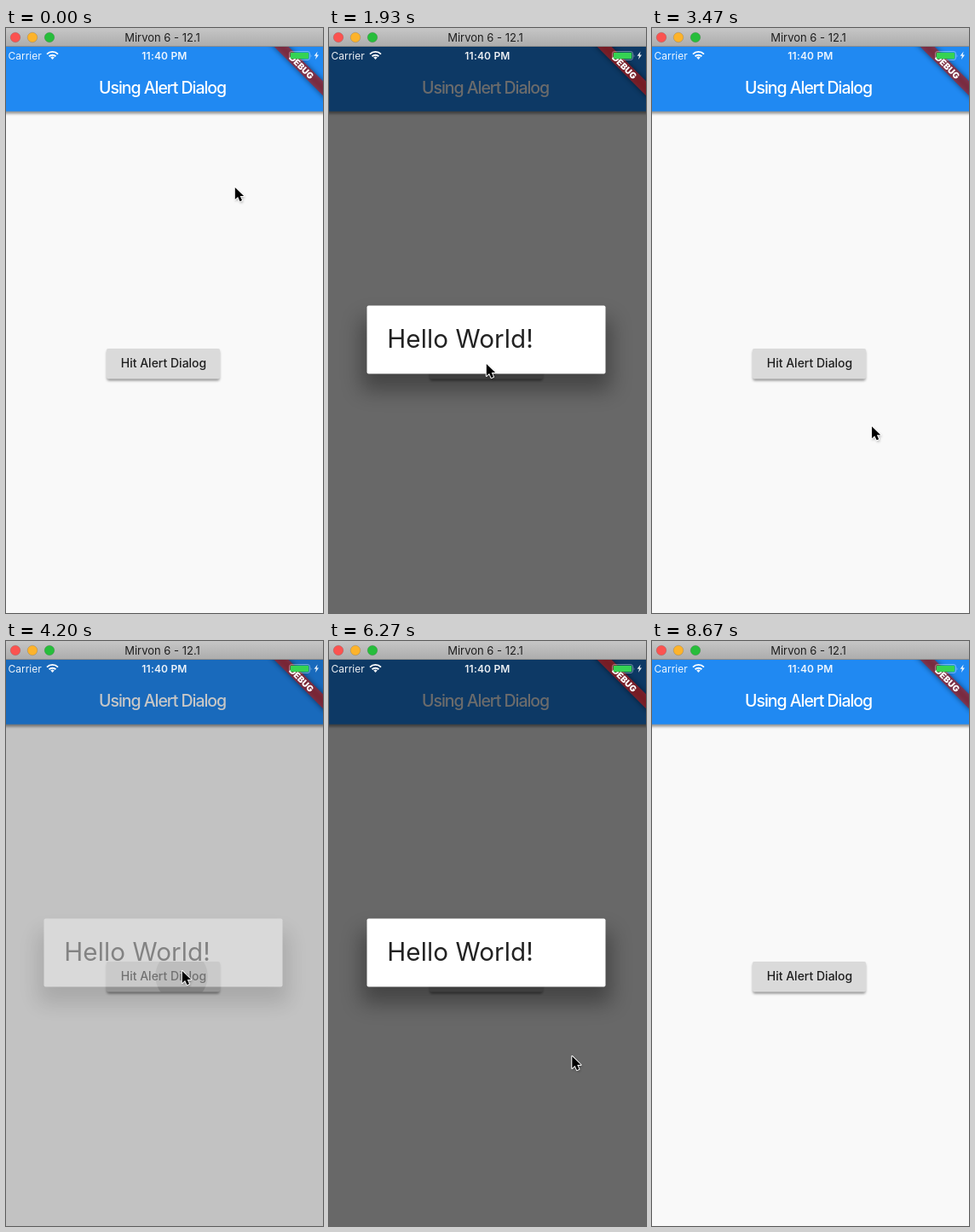
An HTML page for the animation above (8740 ms loop, 372x686 px).

```html
<!DOCTYPE html>
<html lang="en">
<head>
<meta charset="utf-8">
<title>Alert dialog</title>
<style>
html, body { margin: 0; width: 100%; height: 100%; overflow: hidden; }
svg { display: block; width: 100vw; height: 100vh; }
text { font-family: Inter, "Open Sans", sans-serif; }
</style>
</head>
<body>
<svg viewBox="0 0 372 686" xmlns="http://www.w3.org/2000/svg">
  <defs>
    <linearGradient id="chrome" x2="0" y2="1">
      <stop offset="0" stop-color="#c6c6c6"/>
      <stop offset="1" stop-color="#adadad"/>
    </linearGradient>
    <filter id="blur1" x="-20%" y="-50%" width="140%" height="200%"><feGaussianBlur stdDeviation="1.4"/></filter>
    <filter id="blur2" x="-20%" y="-100%" width="140%" height="300%"><feGaussianBlur stdDeviation="3"/></filter>
    <filter id="blur3" x="-20%" y="-60%" width="140%" height="220%"><feGaussianBlur stdDeviation="12"/></filter>
    <clipPath id="app"><rect y="22" width="372" height="664"/></clipPath>
    <clipPath id="btn"><rect x="118" y="376" width="133" height="35.5" rx="2"/></clipPath>
  </defs>

  <rect width="372" height="686" fill="#f9f9f9"/>

  <!-- Button -->
  <rect x="118.5" y="378" width="132" height="35.5" rx="2" opacity=".42" filter="url(#blur1)"/>
  <rect x="118" y="376" width="133" height="35.5" rx="2" fill="#dadada"/>
  <g clip-path="url(#btn)"><circle id="ripple" fill="#000"/></g>
  <text x="185" y="398.3" font-size="14" font-weight="500" text-anchor="middle" fill="#1e1e1e">Hit Alert Dialog</text>

  <!-- App bar -->
  <g clip-path="url(#app)">
    <rect x="-10" y="22" width="392" height="78.5" opacity=".4" filter="url(#blur1)"/>
    <rect y="22" width="372" height="75.7" fill="#2089f2"/>
    <text x="183.6" y="77" font-size="19.5" font-weight="500" letter-spacing="-1.03" text-anchor="middle" fill="#fff">Using Alert Dialog</text>
  </g>

  <rect id="barrier" y="22" width="372" height="664"/>

  <g id="dialog">
    <rect x="38" y="341" width="293" height="84" rx="3" opacity=".34" filter="url(#blur3)"/>
    <rect x="44.5" y="325.5" width="280" height="80" rx="2" fill="#fff"/>
    <text x="68.2" y="374.8" font-size="29.6" letter-spacing=".1" fill="#222">Hello World!</text>
  </g>

  <!-- Debug ribbon -->
  <g clip-path="url(#app)">
    <g transform="translate(370.7 21.4) rotate(45)">
      <rect x="-48" y="28" width="96" height="12" opacity=".5" filter="url(#blur2)"/>
      <rect x="-48" y="28" width="96" height="12" fill="#b71c1c" opacity=".63"/>
      <text y="37.7" font-size="10.2" font-weight="900" text-anchor="middle" fill="#fff">DEBUG</text>
    </g>
  </g>

  <!-- Status bar -->
  <g fill="#fff" fill-opacity=".92">
    <text x="2.5" y="37" font-size="12">Carrier</text>
    <text x="186" y="37" font-size="12" font-weight="600" letter-spacing=".2" text-anchor="middle">11:40 PM</text>
    <path d="M54.5 37l-2.3-2.4a3.3 3.3 0 0 1 4.6 0z"/>
    <g fill="none" stroke="#fff" stroke-width="1.9">
      <path d="M50.6 33.3a5.6 5.6 0 0 1 7.8 0"/>
      <path d="M48 30.6a9.2 9.2 0 0 1 13 0"/>
    </g>
    <rect x="332.5" y="27.5" width="24" height="10" rx="2.5" fill="none" stroke="#fff" stroke-opacity=".38"/>
    <rect x="333.7" y="28.7" width="21.6" height="7.6" rx="1.4" fill="#35d353" fill-opacity="1"/>
    <path d="M357.6 30.5q1.6 2 0 4z" fill-opacity=".4"/>
    <path d="M365.6 27.5l-4 5.2h2.4l-1 4.3 4-5.4h-2.4z"/>
  </g>

  <!-- Window title -->
  <rect width="372" height="21" fill="url(#chrome)"/>
  <rect y="21" width="372" height="1" fill="#8c8c8c"/>
  <g stroke-opacity=".16" stroke="#000" stroke-width=".8">
    <circle cx="11" cy="11" r="5.8" fill="#fb5350"/>
    <circle cx="31" cy="11" r="5.8" fill="#fdb32b"/>
    <circle cx="51" cy="11" r="5.8" fill="#27bd3b"/>
  </g>
  <text x="183.5" y="16" font-size="13" text-anchor="middle" fill="#1e1e1e">Mirvon 6 - 12.1</text>

  <g id="cursor">
    <path d="M1.5 2.5v15l3.6-3.2 2.4 5 2.8-1.2-2.3-4.9h4.7z" opacity=".35" filter="url(#blur1)"/>
    <path d="M.8 1v14l3.3-3 2.4 5.2 2.5-1.1-2.3-5h4.4z" stroke="#fff" stroke-width="2" stroke-linejoin="round" paint-order="stroke"/>
  </g>
</svg>

<script>
const LOOP = 8740, STEP = LOOP / 131;
const FADE = 150, DIM = 0.58;

// Pointer stops: time, x, y
const stops = [
  [70, 268, 186], [870, 184, 393],
  [1980, 184, 393], [2600, 266, 480],
  [3300, 266, 480], [4000, 206, 386],
  [5230, 206, 386], [6000, 284.5, 486],
  [6560, 284.5, 486], [6980, 384, 500]
];
const shows = [[1095, 2700], [4145, 6430]]; // dialog opens, closes
const taps = [1010, 4065];

const el = id => document.getElementById(id);
const [ripple, barrier, dialog, cursor] = ["ripple", "barrier", "dialog", "cursor"].map(el);
const clamp = v => Math.min(1, Math.max(0, v));
const ramp = (t, start, length) => clamp((t - start) / length);
const ease = p => p * p * (3 - 2 * p);

function pointerAt(t) {
  let [, x, y] = stops[0];
  for (let i = 1; i < stops.length; i++) {
    const [t0, x0, y0] = stops[i - 1], [t1, x1, y1] = stops[i];
    if (t < t0) break;
    const p = ease(ramp(t, t0, t1 - t0));
    x = x0 + (x1 - x0) * p;
    y = y0 + (y1 - y0) * p;
  }
  return [x, y];
}

function draw(t) {
  const [x, y] = pointerAt(t);
  cursor.setAttribute("transform", `translate(${x} ${y})`);

  const shown = shows.reduce((sum, [open, close]) =>
    sum + ramp(t, open, FADE) - ramp(t, close, FADE), 0);
  barrier.setAttribute("opacity", DIM * shown);
  dialog.setAttribute("opacity", shown);

  const tap = taps.find(s => t >= s && t < s + 450);
  const age = tap === undefined ? 0 : t - tap;
  const [cx, cy] = pointerAt(tap ?? 0);
  ripple.setAttribute("cx", cx);
  ripple.setAttribute("cy", cy + 7);
  ripple.setAttribute("r", age ? 8 + age * 0.165 : 0);
  ripple.setAttribute("opacity", 0.13 * (1 - ramp(age, 200, 250)));
}

function tick() {
  const t = performance.now() % LOOP;
  draw(Math.floor(t / STEP + 0.06) * STEP);
  requestAnimationFrame(tick);
}
tick();
</script>
</body>
</html>
```
